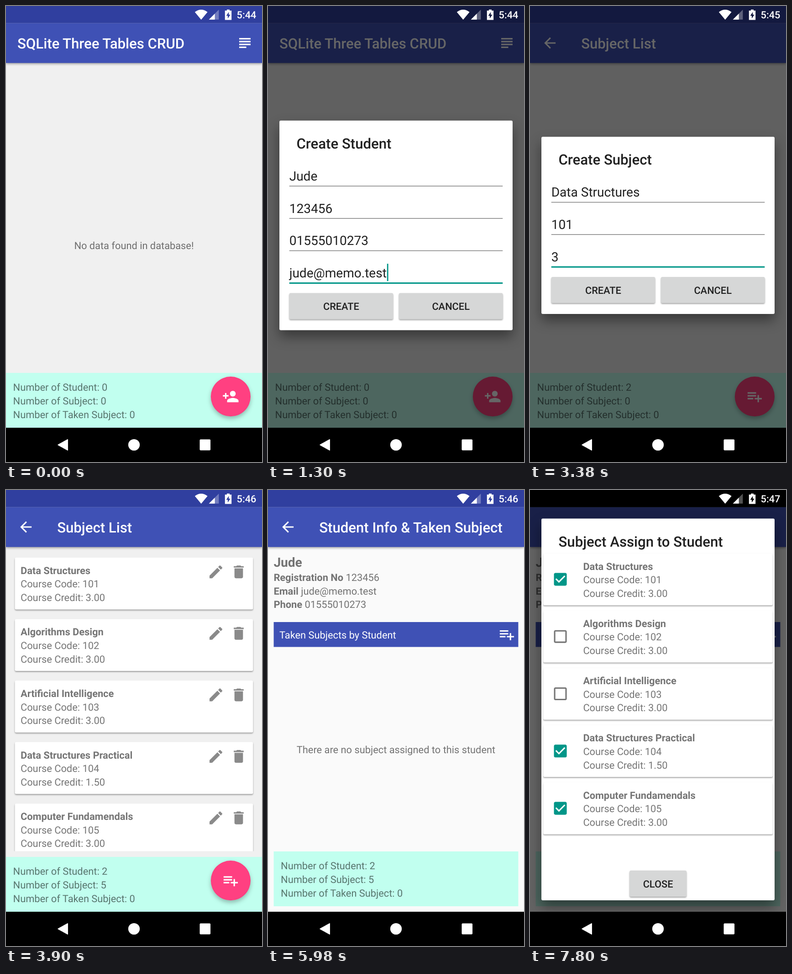
These frames come from a looping animation (561x998 px, 8 s). An HTML page:

```html
<!DOCTYPE html>
<html lang="en">
<head>
<meta charset="utf-8">
<title>Student database app</title>
<style>
html, body { margin: 0; width: 100%; height: 100%; overflow: hidden; background: #000; }
svg { display: block; width: 561px; height: 998px; font-family: Roboto, sans-serif; text-rendering: geometricPrecision; }
.bar { filter: drop-shadow(0 2px 2.5px rgba(0,0,0,.36)); }
.card { filter: drop-shadow(0 2px 1.6px rgba(0,0,0,.36)); }
.fab { filter: drop-shadow(0 5px 5px rgba(0,0,0,.26)); }
.dialog { filter: drop-shadow(0 14px 14px rgba(0,0,0,.42)); }
</style>
</head>
<body>
<svg id="stage" viewBox="0 0 561 998" xmlns="http://www.w3.org/2000/svg"></svg>
<script>
const stage = document.getElementById('stage');
const DP = 561 / 360;
const GREY = 'rgba(0,0,0,.54)', DARK = '#212121', TEAL = '#009688', BLUE = '#3f51b5';
const student = { name: 'Jude', reg: '123456', phone: '01555010273', email: 'jude@memo.test' };
const subjects = [
  ['Data Structures', '3.00'],
  ['Algorithms Design', '3.00'],
  ['Artificial Intelligence', '3.00'],
  ['Data Structures Practical', '1.50'],
  ['Computer Fundamendals', '3.00']
];

const icons = {
  menu: 'M14 17H4v2h10zM20 9H4v2h16zM4 15h16v-2H4zM4 5v2h16V5z',
  back: 'M20 11H7.83l5.59-5.59L12 4l-8 8 8 8 1.41-1.41L7.83 13H20z',
  person: 'M15 12c2.21 0 4-1.79 4-4s-1.79-4-4-4-4 1.79-4 4 1.79 4 4 4zm-9-2V7H4v3H1v2h3v3h2v-3h3v-2zm9 4c-2.67 0-8 1.34-8 4v2h16v-2c0-2.66-5.33-4-8-4z',
  add: 'M14 10H2v2h12zM14 6H2v2h12zM18 14v-4h-2v4h-4v2h4v4h2v-4h4v-2zM2 16h8v-2H2z',
  edit: 'M3 17.25V21h3.75L17.81 9.94l-3.75-3.75zM20.71 7.04c.39-.39.39-1.02 0-1.41l-2.34-2.34c-.39-.39-1.02-.39-1.41 0l-1.83 1.83 3.75 3.75z',
  trash: 'M6 19c0 1.1.9 2 2 2h8c1.1 0 2-.9 2-2V7H6zM19 4h-3.5l-1-1h-5l-1 1H5v2h14z',
  box: 'M19 5v14H5V5h14m0-2H5c-1.1 0-2 .9-2 2v14c0 1.1.9 2 2 2h14c1.1 0 2-.9 2-2V5c0-1.1-.9-2-2-2z',
  checked: 'M19 3H5c-1.1 0-2 .9-2 2v14c0 1.1.9 2 2 2h14c1.1 0 2-.9 2-2V5c0-1.1-.9-2-2-2zm-9 14l-5-5 1.41-1.41L10 14.17l7.59-7.59L19 8z'
};

const rect = (x, y, w, h, fill, extra = '') =>
  `<rect x="${x}" y="${y}" width="${w}" height="${h}" fill="${fill}" ${extra}/>`;
const path = (d, fill, extra = '') => `<path d="${d}" fill="${fill}" ${extra}/>`;
const text = (x, y, s, { size = 14, weight = 400, fill = GREY, anchor = 'start', id = '' } = {}) =>
  `<text x="${x}" y="${y}" font-size="${size * DP}" font-weight="${weight}" fill="${fill}" text-anchor="${anchor}" ${id && `id="${id}"`}>${s}</text>`;
const icon = (name, cx, cy, fill = '#fff') =>
  path(icons[name], fill, `transform="translate(${cx - 12 * DP} ${cy - 12 * DP}) scale(${DP})"`);

const title = s => ({ size: 20, weight: 500, fill: s });

function toolbar(label, home) {
  return rect(0, 37.4, 561, 87.3, BLUE, 'class="bar"') +
    rect(0, 0, 561, 37.5, '#303f9f') +
    (home ? icon('menu', 523.5, 81) : icon('back', 43.6, 81)) +
    text(home ? 25 : 112.2, 93, label, title('#fff'));
}

function stats(x, y, w, counts) {
  const labels = ['Student', 'Subject', 'Taken Subject'];
  return rect(x, y, w, 120, '#c1ffef') + labels.map((l, i) =>
    text(x + 15.6, y + 39.3 + i * 29.7, `Number of ${l}: ${counts[i]}`)).join('');
}

const fab = name => '<circle cx="492.4" cy="854.7" r="43.6" fill="#ff4081" class="fab"/>' + icon(name, 492.4, 854.7);

function details(x, y, i) {
  const [name, credit] = subjects[i];
  return text(x, y, name, { weight: 700 }) +
    text(x, y + 29.6, `Course Code: ${101 + i}`) +
    text(x, y + 59.2, `Course Credit: ${credit}`);
}

const page = (bg, body) => rect(0, 0, 561, 998, bg) + body;

const home = () => page('#f0f0f0', toolbar('SQLite Three Tables CRUD', true) +
  text(280.5, 532.3, 'No data found in database!', { anchor: 'middle' }) +
  stats(0, 803, 561, [0, 0, 0]) + fab('person'));

function subjectList(count) {
  let cards = '';
  for (let i = 0; i < count; i++) {
    const y = 147.8 + i * 134.6;
    cards += rect(19.5, y, 521.8, 113.7, '#fff', 'rx="3" class="card"') + details(32, y + 36, i) +
      icon('edit', 460, y + 31.4, '#8a8a8a') + icon('trash', 510, y + 31.4, '#8a8a8a');
  }
  return page('#f0f0f0',
    `<clipPath id="list"><path d="M0 125H561V790.5H0z"/></clipPath><g clip-path="url(#list)">${cards}</g>` +
    toolbar('Subject List') + stats(0, 803, 561, [2, count, 0]) + fab('add'));
}

function studentInfo() {
  const rows = [['Registration No', student.reg], ['Email', student.email], ['Phone', student.phone]];
  return page('#fafafa', toolbar('Student Info &amp; Taken Subject') +
    text(12.4, 167.5, student.name, { size: 18, weight: 700 }) +
    rows.map(([k, v], i) => text(12.4, 198.8 + i * 29.7, `<tspan font-weight="700">${k}</tspan> ${v}`)).join('') +
    rect(12.5, 289, 536, 54.5, BLUE) +
    text(25, 325, 'Taken Subjects by Student', { fill: '#fff' }) + icon('add', 523.5, 316.3) +
    text(280.5, 576, 'There are no subject assigned to this student', { anchor: 'middle' }) +
    stats(12.5, 791, 536, [2, 5, 0]));
}

const dim = () => rect(0, 0, 561, 998, '#000', 'opacity=".6"');
const panel = (y, h) => rect(25, y, 511, h, '#fff', 'rx="3" class="dialog"');
const button = (x, y, w, label) => rect(x, y, w, 57.2, '#d6d7d7', 'rx="3" class="card"') +
  text(x + w / 2, y + 36.8, label, { weight: 500, fill: DARK, anchor: 'middle' });

function form(top, label, values) {
  const step = 70.7, n = values.length, by = top + 94.6 + n * step;
  return dim() + panel(top, 175.8 + n * step) + text(62.5, top + 61, label, title(DARK)) +
    values.map((v, i) => {
      const y = top + 131.2 + i * step, last = i === n - 1;
      return text(46.7, y, v, { size: 18, fill: DARK, id: last ? 'field' : '' }) +
        (last ? rect(46.7, y + 10.8, 467.6, 3.1, TEAL) : rect(46.7, y + 11.4, 467.6, 1.5, '#7f7f7f'));
    }).join('') +
    button(46.7, by, 227.4, 'CREATE') + button(287, by, 227.4, 'CANCEL');
}

function assign(picked) {
  return dim() + rect(0, 0, 561, 37.5, '#000') + panel(62.5, 835.5) +
    text(62.5, 123.6, 'Subject Assign to Student', title(DARK)) +
    subjects.map((s, i) => {
      const y = 138.7 + i * 125.3, on = picked.includes(i);
      return rect(29, y, 503, 113.5, '#fff', 'rx="3" class="card"') + details(116.4, y + 35.8, i) +
        icon(on ? 'checked' : 'box', 66.5, y + 56.7, on ? TEAL : '#757575');
    }).join('') +
    button(218.3, 832.8, 124.6, 'CLOSE');
}

function systemBars(clock) {
  return path('M413.8 13.2Q427.7 2.8 441.6 13.2L427.7 30z', '#fff') +
    path('M466.4 8V29.8H444.6z', '#fff', 'opacity=".32"') +
    path('M457.6 16.8V29.8H444.6z', '#fff') +
    path('M484 7.8H490V10H494.2V30.6H479.8V10H484zM488.2 13L482.6 21.6H486V27.6L491.6 19H488.2z', '#fff', 'fill-rule="evenodd"') +
    text(548.5, 27.2, clock, { weight: 500, fill: '#fff', anchor: 'end' }) +
    rect(0, 923, 561, 75, '#000') +
    path('M135 949V972L114.2 960.5z', '#fff', 'stroke="#fff" stroke-width="1.8" stroke-linejoin="round"') +
    '<circle cx="280.5" cy="960.5" r="12.6" fill="#fff"/>' +
    rect(424.5, 948.6, 23.6, 23.8, '#fff', 'rx="2"');
}

function addCaret() {
  const field = document.getElementById('field');
  const x = 47.6 + field.getComputedTextLength(), y = field.getAttribute('y') - 30;
  field.insertAdjacentHTML('afterend', rect(x, y, 2.8, 38, TEAL));
}

const STEP = 1300, LOOP = 8000;
const scenes = [
  ['5:44', home],
  ['5:44', () => home() + form(250.8, 'Create Student', Object.values(student)), true],
  ['5:45', () => subjectList(0) + form(286.2, 'Create Subject', ['Data Structures', '101', '3'])],
  ['5:46', () => subjectList(5)],
  ['5:46', studentInfo],
  ['5:47', () => studentInfo() + assign([])],
  ['5:47', () => studentInfo() + assign([0, 3, 4])]
];

let shown = -1;
function draw(ms) {
  const i = Math.floor(ms % LOOP / STEP);
  if (i === shown) return;
  shown = i;
  const [clock, scene, caret] = scenes[i];
  stage.innerHTML = scene() + systemBars(clock);
  if (caret) addCaret();
}

const start = performance.now();
function tick() {
  draw(performance.now() - start);
  requestAnimationFrame(tick);
}
tick();
</script>
</body>
</html>
```
